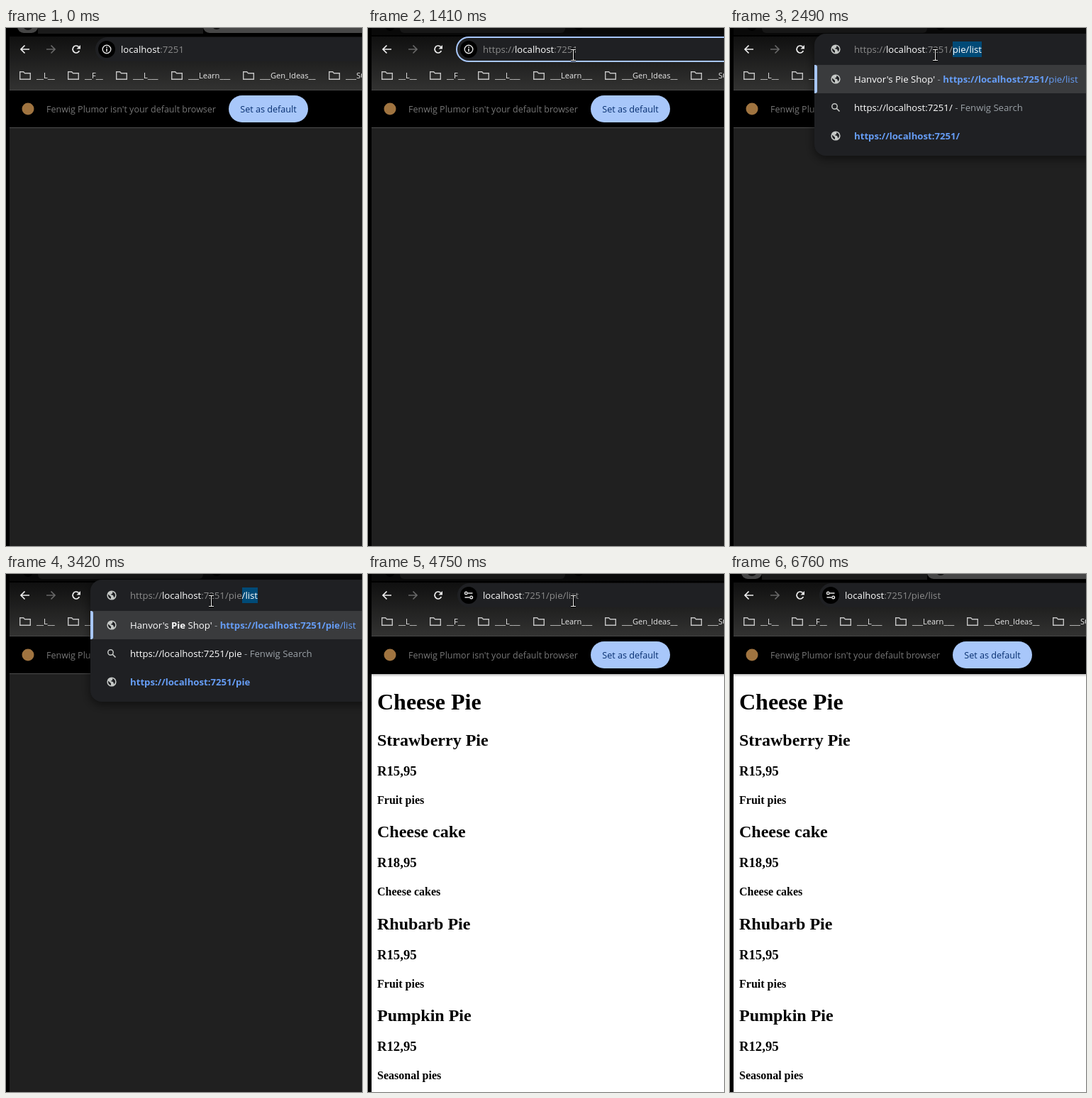
Recreate the animation shown at these times as an HTML page with a canvas. Size 502 by 730 pixels, loop 6.83 s.

```html
<!DOCTYPE html>
<html lang="en">
<head>
<meta charset="utf-8">
<title>Pie list</title>
<style>
html, body { margin: 0; width: 100%; height: 100%; overflow: hidden; background: #000; }
canvas { display: block; }
</style>
</head>
<body>
<canvas id="stage" width="502" height="730"></canvas>
<script>
const ctx = document.getElementById('stage').getContext('2d');
const LOOP = 6830;
const UI = '"Open Sans", "Noto Sans", sans-serif';
const SERIF = '"Liberation Serif", "Times New Roman", serif';
const WHITE = '#fff', GREY = '#8b8b8b', BLUE = '#669df6', PALE = '#a8c7fa';
const PANEL = '#1f2023', SELECT = '#004a77', PAGE = '#202020';

// Each entry changes part of the state from its time on.
const steps = [
  [0, { active: false, focus: false, full: false, typed: '', rest: '', all: false,
        caret: false, popup: false, icon: 'info', stop: false, page: false }],
  [350, { active: true, focus: true, all: true }],
  [890, { full: true, all: false, caret: true }],
  [1410, { caret: false }],
  [1960, { caret: true }],
  [2350, { focus: false, caret: false, typed: '/', rest: 'pie/list', icon: 'globe' }],
  [2420, { popup: true }],
  [2750, { typed: '/p', rest: 'ie/list' }],
  [3280, { typed: '/pi', rest: 'e/list' }],
  [3420, { typed: '/pie', rest: '/list' }],
  [4080, { typed: '/pie/list', rest: '', caret: true }],
  [4610, { full: false, caret: false, icon: 'info' }],
  [4680, { stop: true }],
  [4750, { popup: false, stop: false, icon: 'tune', page: true }],
  [6760, { active: false }]
];

// Pointer samples: time, x, y
const track = [
  [140, 478, 62], [210, 405, 52], [280, 325, 41], [350, 288, 35], [420, 286, 35],
  [680, 286, 34], [750, 287, 35], [890, 289, 37], [1080, 288, 38], [1410, 289, 38],
  [5690, 262, 32], [5760, 200, 31], [5830, 156, 36], [5900, 205, 82], [5970, 285, 116],
  [6030, 337, 168], [6100, 393, 347], [6170, 440, 515], [6230, 470, 665]
];

function stateAt(t) {
  return Object.assign({}, ...steps.filter(s => s[0] <= t).map(s => s[1]));
}

function rect(x, y, w, h, color) {
  ctx.fillStyle = color;
  ctx.fillRect(x, y, w, h);
}

function round(x, y, w, h, r, color) {
  ctx.beginPath();
  ctx.roundRect(x, y, w, h, r);
  ctx.fillStyle = color;
  ctx.fill();
}

function disc(x, y, r, color) {
  ctx.beginPath();
  ctx.arc(x, y, r, 0, Math.PI * 2);
  ctx.fillStyle = color;
  ctx.fill();
}

function ring(x, y, r, color, width) {
  ctx.beginPath();
  ctx.arc(x, y, r, 0, Math.PI * 2);
  ctx.strokeStyle = color;
  ctx.lineWidth = width;
  ctx.stroke();
}

function lines(color, width, ...paths) {
  ctx.beginPath();
  for (const p of paths)
    for (let i = 0; i < p.length; i += 2) ctx[i ? 'lineTo' : 'moveTo'](p[i], p[i + 1]);
  ctx.strokeStyle = color;
  ctx.lineWidth = width;
  ctx.stroke();
}

function shade(y0, y1, from, to) {
  const g = ctx.createLinearGradient(0, y0, 0, y1);
  g.addColorStop(0, from);
  g.addColorStop(1, to);
  return g;
}

function text(str, x, y, size, color, weight = 400, family = UI) {
  ctx.font = `${weight} ${size}px ${family}`;
  ctx.fillStyle = color;
  ctx.fillText(str, x, y);
  return ctx.measureText(str).width;
}

// Runs of [string, color, weight, background]; returns the end x.
function runs(x, y, list) {
  for (const [str, color, weight = 400, back] of list) {
    if (!str) continue;
    ctx.font = `${weight} 13.2px ${UI}`;
    if (back) rect(Math.round(x), y - 16, Math.round(ctx.measureText(str).width), 22, back);
    x += text(str, x, y, 13.2, color, weight);
  }
  return x;
}

function tabStrip(active) {
  rect(5, 0, 497, 12, '#000');
  if (active) {
    rect(5, 0, 497, 10, '#090909');
    round(45, -10, 233, 17, [0, 0, 6, 6], '#171717');
    disc(31, -3, 7, '#000');
    disc(297, -4, 7, '#000');
  } else {
    rect(45, 0, 233, 8, '#1a1a1a');
    round(16, -12, 29, 19, [0, 0, 9, 9], '#454545');
    round(278, -12, 240, 19, [0, 0, 0, 9], '#474747');
    disc(31, -4, 7, '#111');
    disc(297, -5, 7, '#111');
  }
}

function arrow(x, dir, color) {
  lines(color, 1.7, [x - 5.5 * dir, 30, x + 6 * dir, 30],
    [x - .5 * dir, 24.5, x - 6 * dir, 30, x - .5 * dir, 35.5]);
}

function reload() {
  ctx.beginPath();
  ctx.arc(99, 30, 4.9, .45, 5.5);
  ctx.strokeStyle = '#eee';
  ctx.lineWidth = 1.7;
  ctx.stroke();
  ctx.beginPath();
  ctx.moveTo(105, 24);
  ctx.lineTo(105, 29.5);
  ctx.lineTo(99.5, 29.5);
  ctx.fillStyle = '#eee';
  ctx.fill();
}

function globe(x, y) {
  disc(x, y, 6.6, '#c4c7c5');
  ctx.fillStyle = PANEL;
  ctx.beginPath();
  ctx.moveTo(x - 5, y - 1.5);
  ctx.lineTo(x - 1, y + 2);
  ctx.lineTo(x - 1, y + 5);
  ctx.quadraticCurveTo(x - 5.5, y + 3.5, x - 5, y - 1.5);
  ctx.moveTo(x + 1.5, y - 5);
  ctx.lineTo(x + 1, y - 2.5);
  ctx.lineTo(x - 1.5, y - 1);
  ctx.lineTo(x + 2, y);
  ctx.lineTo(x + 3.5, y + 3.5);
  ctx.quadraticCurveTo(x + 7.5, y - 2, x + 1.5, y - 5);
  ctx.fill();
}

function siteIcon(kind) {
  if (kind === 'globe') return globe(149, 30);
  disc(142, 30, 12, '#000');
  if (kind === 'info') {
    ring(142, 30, 5.8, '#e3e3e3', 1.4);
    rect(141.2, 29, 1.6, 4.4, '#e3e3e3');
    rect(141.2, 26.4, 1.6, 1.6, '#e3e3e3');
  } else {
    lines('#e3e3e3', 1.4, [141, 27, 147.5, 27], [136.5, 33, 143, 33]);
    ring(138.3, 27, 1.8, '#e3e3e3', 1.4);
    ring(145.7, 33, 1.8, '#e3e3e3', 1.4);
  }
}

function folder(x) {
  lines('#c4c4c4', 1.4, [x + .7, 61.7, x + 5.6, 61.7, x + 7.5, 63.7, x + 15.3, 63.7,
    x + 15.3, 72.3, x + .7, 72.3, x + .7, 61]);
}

function toolbar(s) {
  rect(5, 12, 497, 75, shade(12, 87, '#101010', '#323231'));
  rect(5, 87, 497, 1, '#464646');
  arrow(27, 1, '#eee');
  arrow(63, -1, '#676767');
  if (s.stop) lines('#eee', 1.7, [94.5, 25.5, 103.5, 34.5], [103.5, 25.5, 94.5, 34.5]);
  else reload();

  const marks = [[19, '__L__'], [87, '__F__'], [155, '___L___'], [233, '___Learn___'],
    [334, '___Gen_Ideas__'], [455, '___SC___']];
  for (const [x, name] of marks) {
    folder(x);
    text(name, x + 24, 71, 11.1, '#e8e8e8');
  }

  if (s.focus) {
    round(124, 12, 420, 36, 18, PALE);
    round(126, 14, 416, 32, 16, PANEL);
  } else round(126, 13, 420, 34, 17, PANEL);
}

function infoBar() {
  rect(5, 88, 497, 52, '#000');
  disc(31, 114, 8.5, '#a07440');
  text("Fenwig Plumor isn't your default browser", 57, 119, 12.5, '#777');
  round(314, 95, 112, 38, 19, PALE);
  ctx.textAlign = 'center';
  text('Set as default', 370, 119, 12.6, '#062e6f');
  ctx.textAlign = 'left';
}

function pieList() {
  rect(5, 141, 497, 589, '#fff');
  rect(5, 141, 497, 4, shade(141, 145, '#bbb', '#fff'));
  const put = (str, y, size) => text(str, 13, y, size, '#000', 700, SERIF);
  put('Cheese Pie', 191, 32);
  const pies = [
    ['Strawberry Pie', 'R15,95', 'Fruit pies'],
    ['Cheese cake', 'R18,95', 'Cheese cakes'],
    ['Rhubarb Pie', 'R15,95', 'Fruit pies'],
    ['Pumpkin Pie', 'R12,95', 'Seasonal pies']
  ];
  pies.forEach(([name, price, kind], i) => {
    const dy = Math.round(i * 129.4);
    put(name, 242 + dy, 24);
    put(price, 284 + dy, 18.72);
    put(kind, 324 + dy, 16);
  });
}

function popup(s) {
  ctx.save();
  ctx.shadowColor = 'rgba(0,0,0,.55)';
  ctx.shadowBlur = 14;
  ctx.shadowOffsetY = 4;
  round(119, 8, 420, s.rest ? 172 : 132, 16, PANEL);
  ctx.restore();

  rect(119, 52, 383, 40, '#3a3b3d');
  round(119, 52, 4, 40, [0, 3, 3, 0], PALE);
  const url = 'https://localhost:7251' + s.typed;
  const n = Math.min(3, s.typed.length - 1);
  globe(149, 72);
  runs(175, 77, [["Hanvor's ", WHITE], ['Pie'.slice(0, n), WHITE, 700],
    ['Pie'.slice(n) + " Shop'", WHITE], [' - ', '#9aa0a6'],
    [url, BLUE, 700], [s.rest, BLUE]]);

  ring(147.5, 110.5, 3.7, '#c4c7c5', 1.5);
  lines('#c4c7c5', 1.7, [150, 113, 154.5, 117.5]);
  runs(175, 117, [[url, WHITE], [' - Fenwig Search', '#9aa0a6']]);

  if (s.rest) {
    globe(149, 152);
    runs(175, 157, [[url, BLUE, 700]]);
  }
}

function address(s) {
  siteIcon(s.icon);
  const back = s.all ? SELECT : null;
  const end = runs(s.icon === 'globe' ? 175 : 162, 35, [
    [s.full ? 'https://' : '', GREY],
    ['localhost', WHITE, 400, back],
    [':7251' + s.typed, s.all ? WHITE : GREY, 400, back],
    [s.rest, WHITE, 400, SELECT]
  ]);
  if (s.caret) rect(Math.round(end), 19, 1, 19, WHITE);
}

function beam(x, y) {
  const shape = [[x - 3, y - 7.5, x + 4, y - 7.5], [x + .5, y - 7.5, x + .5, y + 7.5],
    [x - 3, y + 7.5, x + 4, y + 7.5]];
  lines('#000', 3, ...shape);
  lines('#fff', 1, ...shape);
}

function pointer(x, y) {
  const p = [0, 0, 0, 16, 4, 12.5, 6.5, 18, 9, 17, 6.5, 11.5, 11.5, 11.5];
  ctx.beginPath();
  for (let i = 0; i < p.length; i += 2) ctx.lineTo(x + p[i], y + p[i + 1]);
  ctx.closePath();
  ctx.fillStyle = '#fff';
  ctx.fill();
  ctx.strokeStyle = '#000';
  ctx.lineWidth = 1;
  ctx.stroke();
}

function cursor(t) {
  if (t >= 6300) return;
  const at = track.filter(p => p[0] <= t).pop();
  if (!at) return;
  const [, x, y] = at;
  if (y < 47 && x > 150) beam(x, y);
  else pointer(x, y);
}

function draw(t) {
  const s = stateAt(t);
  rect(0, 0, 502, 730, '#000');
  rect(5, 141, 497, 589, PAGE);
  tabStrip(s.active);
  toolbar(s);
  infoBar();
  if (s.page) pieList();
  else rect(5, 140, 497, 1, '#4c4c4c');
  if (s.popup) popup(s);
  address(s);
  cursor(t);
}

const start = performance.now();
function tick() {
  draw((performance.now() - start) % LOOP);
  requestAnimationFrame(tick);
}
tick();
</script>
</body>
</html>
```
